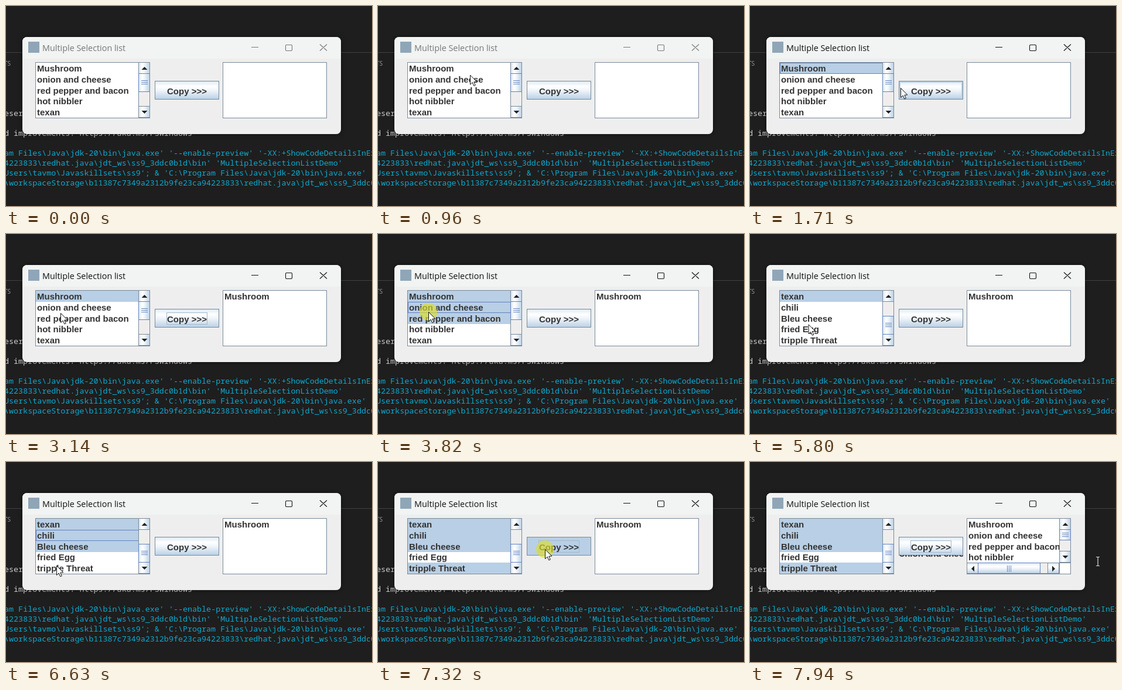
An HTML page with a canvas for the animation above (8000 ms loop, 625 by 342 pixels).

```html
<!DOCTYPE html>
<html lang="en">
<head>
<meta charset="utf-8">
<style>
html, body { margin: 0; width: 100%; height: 100%; overflow: hidden; background: #1e1e1e; }
canvas { display: block; }
</style>
</head>
<body>
<canvas width="625" height="342"></canvas>
<script>
const canvas = document.querySelector('canvas');
const ctx = canvas.getContext('2d');
const LOOP = 8000, ROW = 18.75, CLICK_MS = 190;
const BORDER = '#7a8a99', BLUE = '#6382bf', SELECTED = '#b8cfe5';
const BOLD = 'bold 15px "Liberation Sans", Arial, sans-serif';
const MONO = '13.38px "Noto Sans Mono", monospace';
const TITLE = '14.4px "Open Sans", sans-serif';
const ITEMS = ['Mushroom', 'onion and cheese', 'red pepper and bacon', 'hot nibbler', 'texan',
  'chili', 'Bleu cheese', 'fried Egg', 'tripple Threat'];

// [time, item] for the list, times only for the button
const PICKS = [[1300, 0], [3320, 2], [3750, 1], [4400, 4], [4950, 3], [5950, 6], [6330, 5], [6800, 8]];
const COPIES = [2060, 7320];
const CLICKS = [...PICKS.map(p => p[0]), ...COPIES];

// [time, x, y] of the pointer
const PATH = [[70, 424, 306], [750, 161, 119], [890, 161, 119], [1100, 146, 114], [1500, 146, 114],
  [1710, 257, 140], [2000, 290, 150], [2400, 290, 150], [2600, 190, 160], [2810, 93, 135],
  [3140, 93, 135], [3300, 89, 148], [3500, 89, 148], [3720, 86, 133], [3960, 86, 133],
  [4350, 100, 181], [4560, 100, 181], [4720, 108, 168], [4900, 111, 161], [5250, 111, 161],
  [5470, 105, 164], [5670, 105, 164], [5900, 96, 148], [6130, 96, 148], [6300, 90, 122],
  [6490, 90, 122], [6630, 86, 177], [6780, 86, 181], [6960, 86, 181], [7190, 285, 149],
  [7730, 285, 149], [7940, 594, 170]];

function pointerAt(t) {
  const i = PATH.findIndex(p => p[0] > t);
  if (i < 0) return PATH.at(-1).slice(1);
  const [t0, x0, y0] = PATH[i - 1], [t1, x1, y1] = PATH[i];
  const u = (t - t0) / (t1 - t0), e = u * u * (3 - 2 * u);
  return [x0 + (x1 - x0) * e, y0 + (y1 - y0) * e];
}

function fill(color, x, y, w, h) {
  ctx.fillStyle = color;
  ctx.fillRect(x, y, w, h);
}

function frame(color, x, y, w, h) {
  ctx.lineWidth = 1;
  ctx.strokeStyle = color;
  ctx.strokeRect(x + .5, y + .5, w - 1, h - 1);
}

function text(str, x, y, font, color) {
  ctx.font = font;
  ctx.fillStyle = color;
  ctx.fillText(str, x, y);
}

function clipped(x, y, w, h, draw) {
  ctx.save();
  ctx.beginPath();
  ctx.rect(x, y, w, h);
  ctx.clip();
  draw();
  ctx.restore();
}

function polygon(points, color) {
  ctx.beginPath();
  points.forEach(([x, y]) => ctx.lineTo(x, y));
  ctx.closePath();
  ctx.fillStyle = color;
  ctx.fill();
}

function shine(x0, y0, x1, y1) {
  const g = ctx.createLinearGradient(x0, y0, x1, y1);
  g.addColorStop(0, '#dde8f3');
  g.addColorStop(.3, '#fff');
  g.addColorStop(.5, '#f0f5fa');
  g.addColorStop(1, SELECTED);
  return g;
}

function terminal() {
  fill('#1e1e1e', 0, 0, 625, 342);
  fill('#414141', 0, 79, 625, 1);
  text('TS', -3, 102, '10px "Open Sans", sans-serif', '#9d9d9d');
  const line = (str, x, y, color = '#11a8cd') => text(str, x, y, MONO, color);
  line('eserved.', -3, 188, '#ccc');
  line('d improvements! https://aka.ms/PSWindows', -3, 222, '#ccc');
  line("ram Files\\Java\\jdk-20\\bin\\java.exe' '--enable-preview' '-XX:+ShowCodeDetailsInEx", -11, 256);
  line("94223833\\redhat.java\\jdt_ws\\ss9_3ddc0b1d\\bin' 'MultipleSelectionListDemo'", -11, 273);
  line("Users\\tavmo\\Javaskillsets\\ss9'; & 'C:\\Program Files\\Java\\jdk-20\\bin\\java.exe'", -3, 290);
  line('\\workspaceStorage\\b11387c7349a2312b9fe23ca94223833\\redhat.java\\jdt_ws\\ss9_3ddc0b', -3, 307);
}

function windowFrame(active) {
  const color = active ? '#111' : '#777';
  ctx.save();
  ctx.shadowColor = 'rgba(0,0,0,.4)';
  ctx.shadowBlur = 10;
  ctx.beginPath();
  ctx.roundRect(28, 53, 544, 166, 8);
  ctx.fillStyle = '#eee';
  ctx.fill();
  ctx.restore();
  ctx.beginPath();
  ctx.roundRect(28, 53, 544, 37, [8, 8, 0, 0]);
  ctx.fillStyle = '#f1f4f3';
  ctx.fill();
  fill('#8fa6b8', 38, 61, 19, 19);
  text('Multiple Selection list', 62, 77, TITLE, color);
  ctx.strokeStyle = color;
  ctx.lineWidth = 1.1;
  ctx.beginPath();
  ctx.moveTo(419, 70.5); ctx.lineTo(431, 70.5);
  ctx.roundRect(477.5, 66.5, 11, 10, 1.5);
  ctx.moveTo(536, 65.5); ctx.lineTo(548, 76.5);
  ctx.moveTo(548, 65.5); ctx.lineTo(536, 76.5);
  ctx.stroke();
}

// Drawn upright; a horizontal bar swaps the axes.
function scrollBar(x, y, length, thumb, size, horizontal) {
  const width = horizontal ? 18 : 19, mid = 9.5;
  ctx.save();
  ctx.transform(...(horizontal ? [0, 1, 1, 0] : [1, 0, 0, 1]), x, y);
  fill('#eee', 0, 0, width, length);
  frame(BORDER, -1, -1, width + 1, length + 2);
  for (const top of [0, length - 19]) {
    fill(shine(0, 0, width, 0), 0, top, width, 19);
    frame(BORDER, -1, top - 1, width + 1, 20);
  }
  polygon([[mid - 5, 12], [mid, 7], [mid + 5, 12]], '#222');
  polygon([[mid - 5, length - 12], [mid, length - 7], [mid + 5, length - 12]], '#222');
  thumb = Math.round(thumb);
  fill(shine(0, 0, width, 0), 0, thumb, width, size);
  frame(BLUE, -1, thumb - 1, width + 1, size + 1);
  for (const d of [-4, -1, 2]) fill(BLUE, 4, thumb + Math.floor(size / 2) + d, 11, 1);
  ctx.restore();
}

function listBox(x, width, height, items, offset, selected, lead) {
  clipped(x + 1, 97, width, height, () => {
    items.slice(offset).forEach((item, row) => {
      const i = row + offset, top = Math.round(97 + row * ROW);
      if (selected.includes(i)) fill(SELECTED, x + 1, top, width, 19);
      if (i === lead) frame(BLUE, x + 1, top, width, 19);
      text(item, x + 3, top + 15, BOLD, '#333');
    });
  });
}

function listFrame(x, w) {
  fill('#fff', x, 96, w, 96);
  frame(BORDER, x, 96, w, 96);
}

function button(hover, pressed, focused) {
  fill(pressed ? SELECTED : shine(0, 128, 0, 160), 254, 128, 110, 32);
  frame(BORDER, 254, 128, 110, 32);
  if (hover && !pressed) {
    frame(SELECTED, 255, 129, 108, 30);
    frame(SELECTED, 256, 130, 106, 28);
  }
  if (focused) frame('#a3b8cc', 274, 134, 70, 21);
  text('Copy >>>', 275, 151, BOLD, '#333');
}

function pointer(x, y) {
  if (x < 28 || x > 572 || y > 219) {
    fill('#ddd', x - .5, y - 8, 1.2, 16);
    fill('#ddd', x - 3, y - 8, 6, 1);
    fill('#ddd', x - 3, y + 7, 6, 1);
    return;
  }
  polygon([[0, 0], [0, 16], [3.7, 12.6], [6.3, 18.4], [8.8, 17.3], [6.3, 11.7], [11.4, 11.5]]
    .map(([dx, dy]) => [x + dx + .5, y + dy + .5]), '#fff');
  ctx.strokeStyle = '#111';
  ctx.lineWidth = 1;
  ctx.stroke();
}

function draw(t) {
  const picks = PICKS.filter(p => p[0] <= t);
  const selected = picks.map(p => p[1]);
  const copyFocused = t >= 2060 && t < 3320 || t >= 7320;
  const offset = t < 5470 ? 0 : t < 5670 ? 3 : 4;
  const [x, y] = t < 70 ? [-20, -20] : pointerAt(t);
  const hover = x >= 254 && x < 364 && y >= 128 && y < 160;
  const clicking = CLICKS.some(c => t >= c && t < c + CLICK_MS);
  const pressed = COPIES.some(c => t >= c && t < c + 130);

  terminal();
  windowFrame(t >= 1300);

  listFrame(50, 196);
  listBox(50, 176, 94, ITEMS, offset, selected, copyFocused ? -1 : selected.at(-1));
  scrollBar(227, 97, 94, 19 + offset / 9 * 56, 31);

  button(hover, pressed, copyFocused);

  listFrame(370, 178);
  if (t >= 7450) {
    listBox(370, 158, 75, ITEMS.filter((_, i) => selected.includes(i)), 0, [], -1);
    scrollBar(529, 97, 75, 19, 18);
    scrollBar(371, 173, 157, 19, 106, true);
    // leftover repaint strip under the button
    clipped(255, 159, 109, 6, () => text('onion and cheese', 255, 162, BOLD, '#333'));
  } else if (t >= 2190) {
    listBox(370, 176, 94, ITEMS.slice(0, 1), 0, [], -1);
  }

  if (clicking) {
    ctx.beginPath();
    ctx.arc(x, y, 15, 0, 7);
    ctx.fillStyle = 'rgba(222,222,40,.65)';
    ctx.fill();
  }
  pointer(x, y);
}

function tick(now) {
  draw(now % LOOP);
  requestAnimationFrame(tick);
}
requestAnimationFrame(tick);
</script>
</body>
</html>
```
